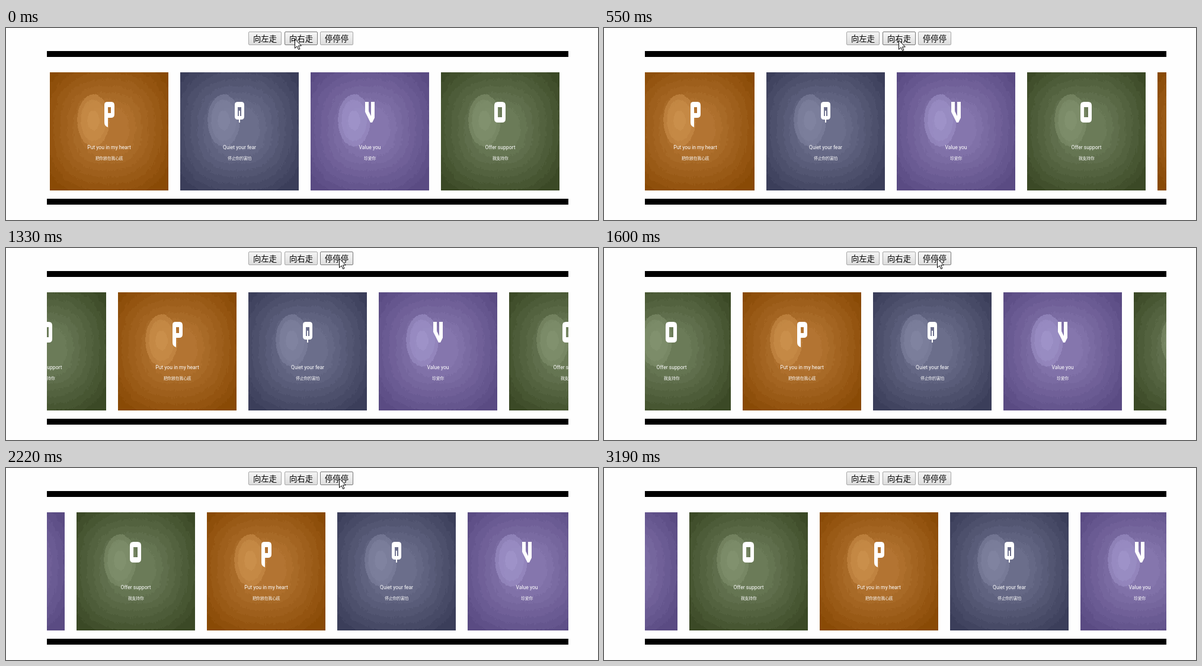
Write an HTML page with a canvas that moves like this. It is 999 px wide and 325 px high and loops after 3.47 s.

```html
<!DOCTYPE html>
<html lang="en">
<head>
<meta charset="utf-8">
<title>Card carousel</title>
<style>
html, body { margin: 0; width: 100%; height: 100%; overflow: hidden; background: #fefefe; }
#stage { position: relative; width: 999px; height: 325px; overflow: hidden; }
.btn {
  position: absolute; top: 6px; width: 56px; height: 23px; box-sizing: border-box;
  border: 1px solid #a6a6a6; border-radius: 2px;
  background: linear-gradient(#f3f3f3, #ececec 40%, #dcdcdc);
  font: 13.33px/21px "Noto Sans CJK SC", "Noto Sans CJK", sans-serif;
  color: #000; text-align: center; white-space: nowrap;
}
.btn.hover { border-color: #777; background: linear-gradient(#f6f6f6, #eee 40%, #dedede); }
.btn.press { border-color: #777; background: linear-gradient(#dcdcdc, #e6e6e6); }
.bar { position: absolute; left: 69px; width: 880px; height: 10px; background: #000; }
#view { position: absolute; left: 69px; top: 75px; width: 880px; height: 200px; overflow: hidden; }
.card { position: absolute; top: 0; width: 200px; height: 200px; }
.card > * { position: absolute; left: 0; top: 0; }
.card svg { fill: #fff; fill-rule: evenodd; text-anchor: middle; }
.en { font: 8.6px Roboto, sans-serif; }
.zh { font: 7px "Noto Sans CJK SC", "Noto Sans CJK", sans-serif; letter-spacing: -.35px; }
#cursor { position: absolute; left: 0; top: 0; }
</style>
</head>
<body>
<div id="stage">
  <div class="btn" style="left:409px">向左走</div>
  <div class="btn" style="left:470px">向右走</div>
  <div class="btn" style="left:530px">停停停</div>
  <div class="bar" style="top:39px"></div>
  <div class="bar" style="top:289px"></div>
  <div id="view"><div id="strip"></div></div>
  <svg id="cursor" width="12" height="19">
    <path d="M.5.8V16.3L4.1 12.9 6.6 18.4 8.9 17.5 6.5 12H11.4Z" fill="#fff" stroke="#000"/>
  </svg>
</div>
<script>
const LOOP = 3470, PITCH = 220, CARD = 200;

// edge, body and glow colours of each card
const cards = [
  { edge: [137, 74, 5], body: [179, 116, 50], glow: [202, 143, 75],
    en: 'Put you in my heart', zh: '把你放在我心底',
    glyph: 'M92 55Q92 50 97 50H104Q109 50 109 56V71Q109 77 103 77H98V93Q92 91 92 85ZM98 59V69H103V59Z' },
  { edge: [59, 62, 90], body: [107, 110, 139], glow: [128, 131, 160],
    en: 'Quiet your fear', zh: '停止你的害怕',
    glyph: 'M92 55Q92 50 97 50H103Q108 50 108 55V75Q108 80 103 80H101V85H99V80H97Q92 80 92 75ZM97 59V74H99V65H101V74H103V59Z' },
  { edge: [90, 75, 131], body: [133, 118, 173], glow: [158, 146, 200],
    en: 'Value you', zh: '珍爱你',
    glyph: 'M92 50H98V66L102 74V50H108V77L104 85H101L92 67Z' },
  { edge: [59, 73, 38], body: [107, 123, 88], glow: [129, 145, 110],
    en: 'Offer support', zh: '我支持你',
    glyph: 'M90 56Q90 50 96 50H103Q109 50 109 56V79Q109 85 103 85H96Q90 85 90 79ZM96 59V76H103V59Z' }
];

const clamp = v => Math.max(0, Math.min(1, v));
const mix = (a, b, k) => a.map((v, i) => v + (b[i] - v) * k);
const hash = (x, y) => {
  const s = Math.sin(x * 127.1 + y * 311.7) * 43758.5453;
  return s - Math.floor(s) - .5;
};
const norm = (x, y, p) => (Math.abs(x) ** p + Math.abs(y) ** p) ** (1 / p);

// Banded, slightly ragged glow
function paint({ edge, body, glow }) {
  const canvas = document.createElement('canvas');
  canvas.width = canvas.height = CARD;
  const ctx = canvas.getContext('2d');
  const image = ctx.createImageData(CARD, CARD);
  for (let y = 0, i = 0; y < CARD; y++) {
    for (let x = 0; x < CARD; x++, i += 4) {
      const rough = hash(x >> 1, y >> 2) * .035 + hash(x >> 3, y >> 3) * .025;
      const d = norm((x - 97) / 102, (y - 94) / 106, 2.5) + rough;
      const base = Math.round(clamp((1.16 - d) / .86) * 8) / 8;
      const h = 1 - norm((x - 73) / 27, (y - 81) / 44, 2) + rough;
      const shine = h > 0 ? .55 + .45 * Math.round(clamp(h * 1.2) * 2) / 2 : 0;
      const rgb = mix(mix(edge, body, base), glow, shine);
      image.data.set([...rgb, 255], i);
    }
  }
  ctx.putImageData(image, 0, 0);
  return canvas;
}

const strip = document.getElementById('strip');
const cursor = document.getElementById('cursor');
const buttons = document.querySelectorAll('.btn');

for (let i = -2; i <= 4; i++) {
  const card = cards[(i + 4) % 4];
  const el = document.createElement('div');
  el.className = 'card';
  el.style.left = i * PITCH + 'px';
  el.innerHTML = `<svg width="200" height="200"><path d="${card.glyph}"/>
    <text class="en" x="100" y="130">${card.en}</text>
    <text class="zh" x="100" y="148">${card.zh}</text></svg>`;
  el.prepend(paint(card));
  strip.append(el);
}

const ticks = [0, 130, 280, 400, 550, 670, 800, 940, 1060, 1180, 1330, 1450, 1600,
  1760, 1910, 2070, 2220, 2340, 2470, 2620, 2770, 2930, 3070, 3190];

// start time, x, y, hovered button
const pointer = [
  [0, 487, 18, 1], [280, 497, 20, 1], [670, 540, 20, 2], [800, 559, 18, 2],
  [940, 562, 17, 2], [2620, 563, 19, 2], [2770, 676, 148, -1],
  [2930, 876, 284, -1], [3070, 937, 306, -1], [3190, 1010, 330, -1]
];

// Left until the second button is clicked, then right until the stop click
function stripX(t) {
  const x = t < 333 ? 74 - .172 * t : Math.min(364, 55.2 + .171 * (t - 550));
  return Math.round((x - 4) / 5) * 5 + 4;
}

function draw() {
  const now = performance.now() % LOOP;
  const t = ticks.findLast(v => v <= now);
  const [, x, y, over] = pointer.findLast(p => p[0] <= t);
  const pressed = t === 280 || t === 2340;
  strip.style.transform = `translateX(${stripX(t) - 69}px)`;
  cursor.style.transform = `translate(${x}px, ${y}px)`;
  buttons.forEach((b, i) => {
    b.className = 'btn' + (i === over ? (pressed ? ' press' : ' hover') : '');
  });
  requestAnimationFrame(draw);
}
draw();
</script>
</body>
</html>
```
